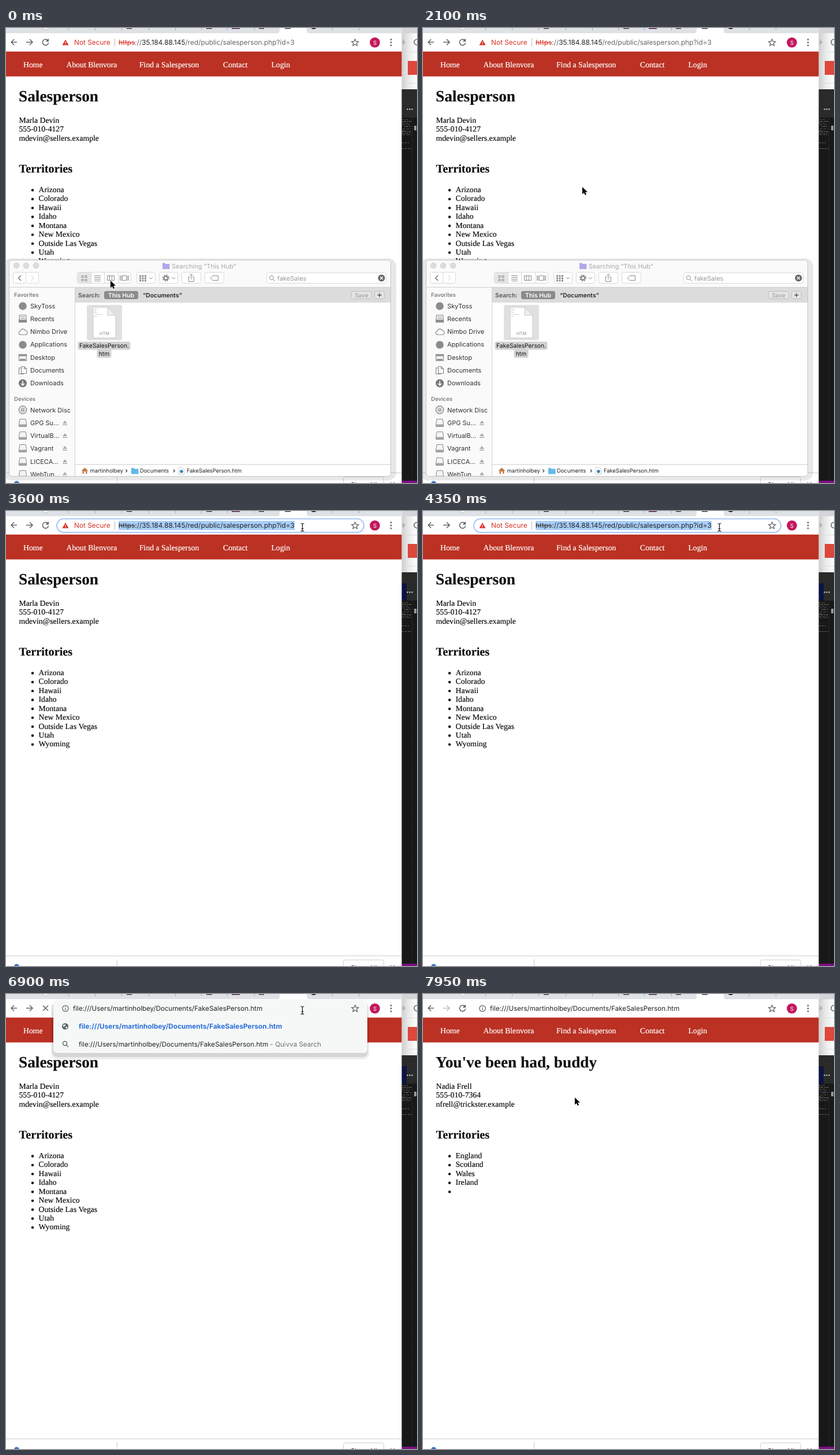
Recreate the animation shown at these times as an HTML page. Size 712 by 787 pixels, loop 8 s.

```html
<!DOCTYPE html>
<html lang="en">
<head>
<meta charset="utf-8">
<title>Browser and file search</title>
<style>
html, body { margin: 0; width: 100%; height: 100%; overflow: hidden; background: #fff; }
svg { display: block; width: 712px; height: 787px; text-rendering: geometricPrecision; }
text, .url { font-family: Inter, "Open Sans", sans-serif; white-space: pre; }
.serif text, .nav { font-family: "Liberation Serif", serif; font-size: 13.7px; }
.serif text { stroke: #000; stroke-width: .15; }
.nav { fill: #fff; stroke: #fff; stroke-width: .2; }
.serif .h1 { font-size: 27.3px; font-weight: 700; }
.serif .h2 { font-size: 20.3px; font-weight: 700; }
.bullets { stroke: #000; stroke-width: 4.4; stroke-linecap: round; stroke-dasharray: 0 15.42; }
.url { font-size: 11.6px; line-height: 16px; color: #222; }
.url.web { font-size: 11.85px; }
.url i { font-style: normal; color: #666; }
.url s { color: #d93025; }
.url .sel { background: #a9cffb; display: inline-block; height: 16px; }
.url .sel s { color: #333; }
.bar { font-size: 11.6px; }
.bar.wide { font-size: 11.85px; }
.line { fill: none; stroke: #5f6368; stroke-width: 1.5; }
.btn { fill: #fff; stroke: #d9d9d9; }
.glyph { fill: none; stroke: #8c8c8c; }
.side { font-size: 11px; fill: #333; }
.head { font-size: 9.6px; font-weight: 600; fill: #7c7c7c; }
.path { font-size: 9.35px; fill: #222; }

.a { animation: 8s step-end infinite; }
.finder { animation-name: finder; }
.gap { animation-name: gap; }
.before { animation-name: before; }
.after { animation-name: after; }
.plain { animation-name: plain; }
.picked { animation-name: picked; }
.typed { animation-name: typed; }
.ghost { animation-name: ghost; }
.panel { animation-name: panel; }
.caret { animation-name: caret; display: inline-block; width: 1px; height: 16px; background: #000; vertical-align: top; }
.opened { animation-name: opened; }
.star { animation-name: star; }
.site { animation-name: site; }
.idle { animation-name: idle; }
.busy { animation-name: busy; }
.arrow { animation-name: arrow; }
.beam { animation-name: beam; }
.mouse { animation-name: mouse; }
@keyframes finder { 0% { opacity: 1 } 28.125% { opacity: 0 } }
@keyframes gap { 0% { opacity: 0 } 28.125% { opacity: 1 } }
@keyframes before { 0% { opacity: 1 } 88.125% { opacity: 0 } }
@keyframes after { 0% { opacity: 0 } 88.125% { opacity: 1 } }
@keyframes plain { 0% { opacity: 1 } 43.125% { opacity: 0 } }
@keyframes picked { 0%, 67.5% { opacity: 0 } 43.125% { opacity: 1 } }
@keyframes typed { 0%, 86.25% { opacity: 0 } 67.5% { opacity: 1 } }
@keyframes ghost { 0%, 69.375% { opacity: 0 } 67.5% { opacity: .7 } }
@keyframes panel { 0%, 88.125% { opacity: 0 } 67.5% { opacity: 1 } }
@keyframes caret { 0%, 80.625% { opacity: 1 } 73.125% { opacity: 0 } }
@keyframes opened { 0% { opacity: 0 } 86.25% { opacity: 1 } }
@keyframes star { 0%, 86.25% { opacity: 1 } 67.5% { opacity: 0 } }
@keyframes site { 0% { opacity: 1 } 67.5% { opacity: 0 } }
@keyframes idle { 0%, 88.125% { opacity: 1 } 86.25% { opacity: 0 } }
@keyframes busy { 0%, 88.125% { opacity: 0 } 86.25% { opacity: 1 } }
@keyframes arrow { 0%, 91.875% { opacity: 1 } 43.125% { opacity: 0 } }
@keyframes beam { 0%, 91.875% { opacity: 0 } 43.125% { opacity: 1 } }
@keyframes mouse {
  0% { transform: translate(181px, 437px) }
  1.875% { transform: translate(290px, 560px) }
  3.75% { transform: translate(400px, 690px) }
  5.625% { transform: translate(330px, 758px) }
  7.5% { transform: translate(150px, 756px) }
  9.375% { transform: translate(250px, 400px) }
  11.25% { transform: translate(420px, 40px) }
  13.125% { transform: translate(470px, 62px) }
  15% { transform: translate(330px, 200px) }
  16.875% { transform: translate(150px, 420px) }
  18.75% { transform: translate(60px, 560px) }
  20.625% { transform: translate(105px, 550px) }
  22.5% { transform: translate(150px, 400px) }
  24.375% { transform: translate(230px, 310px) }
  26.25% { transform: translate(276px, 275px) }
  30% { transform: translate(210px, 200px) }
  31.875% { transform: translate(140px, 142px) }
  35.625% { transform: translate(250px, 100px) }
  37.5% { transform: translate(420px, 50px) }
  39.375%, 43.125% { transform: translate(513px, 28px) }
  91.875% { transform: translate(500px, 80px) }
  93.75% { transform: translate(463px, 141px) }
  97.5% { transform: translate(350px, 165px) }
  99.375%, 100% { transform: translate(263px, 179px) }
}
</style>
</head>
<body>
<svg viewBox="0 0 712 787">
<defs>
  <linearGradient id="edge"><stop stop-color="#cdcdcd"/><stop offset=".45" stop-color="#e9e9e9"/><stop offset="1" stop-color="#fff"/></linearGradient>
  <clipPath id="win"><rect x="6" y="402" width="661" height="373" rx="5"/></clipPath>
  <g id="globe"><circle r="5.6" fill="#5f6368"/><path d="M-4-2q2-2 4-1.5l1 2-3 1.5 0 2zM1 1l3-1-1 3-2 1.5z" fill="#fff"/></g>
  <g id="drive"><path d="M-5-6.5h10l1.500 8v5h-13v-5z" fill="#f4f4f4" stroke="#858585"/><path d="M-6.500 2.500h13v4h-13z" fill="#a5a5a5"/></g>
  <g id="eject" fill="#aaa"><path d="M-4 1L0-4 4 1zM-4 2.500h8v1.500h-8z"/></g>
  <path id="folder" d="M-6-5h4l1.500 1.500H6.500v9H-6z"/>
  <path id="lens" d="M2.300 2.300L5.500 5.500M3-.5a3.500 3.500 0 1 1-7 0a3.500 3.500 0 1 1 7 0z" fill="none"/>
  <path id="next" d="M-1.200-2.500l2.500 2.500-2.500 2.500" fill="none" stroke="#444" stroke-width="1.200"/>
  <g id="menu">
    <text class="nav" x="104.500" y="68">About Blenvora</text><text class="nav" x="231" y="68">Find a Salesperson</text>
    <text class="nav" x="376" y="68">Contact</text><text class="nav" x="459.500" y="68">Login</text>
  </g>
</defs>

<!-- windows behind, right edge -->
<rect x="685" width="27" height="106" fill="url(#edge)"/>
<path d="M685 0h27v9h-27z" fill="#d3d5d8"/>
<path d="M694 41.500h18M694 95.500h18" stroke="#ddd"/>
<path d="M683 24.500h8M687 20.500l4 4-4 4" class="line" style="stroke:#aaa"/>
<path d="M712 19.500a5 5 0 0 0 0 10" class="line"/>
<rect x="696" y="57" width="24" height="24" fill="#dc483c"/>
<path d="M685 106h27v51h-27z" fill="#2a2a2a"/>
<path d="M685 155h27v632h-27z" fill="#181818"/>
<g fill="#ccc"><circle cx="695.500" cy="140.500" r="1.200"/><circle cx="699.500" cy="140.500" r="1.200"/><circle cx="703.500" cy="140.500" r="1.200"/></g>
<g fill="none" stroke-width="1" opacity=".75">
  <path d="M686 158.500h12M686 164.500h14M688 174.500h13M686 182.500h15" stroke="#8f7355" stroke-dasharray="3 2 1 1"/>
  <path d="M686 161.500h16M690 170.500h11M686 179.500h16" stroke="#999" stroke-dasharray="2 1 4 2"/>
  <path d="M687 167.500h14M686 177.500h9M687 184.500h15" stroke="#52708c" stroke-dasharray="4 2 1 1"/>
  <path d="M686 198.500h12M686 208.500h17" stroke="#888" stroke-dasharray="3 2"/>
</g>
<path d="M703.500 157v630" stroke="#333" stroke-dasharray="2 2"/>
<path d="M707 169h4v8h-4z" fill="#999"/>
<path d="M685 783h27v4h-27z" fill="#7c0f83"/>
<path class="a gap" d="M685 125h9v30h-9z" fill="#0c1440"/>

<!-- browser -->
<path d="M0 0h685.500v787H0z" fill="#fff"/>
<path d="M0 0h685.500v9H0z" fill="#dee1e6"/>
<path d="M470 9q4 0 4-5V0h47v4q0 5 4 5z" fill="#fff"/>
<path d="M108.500 0v4M154.500 0v4M200.500 0v4M247.500 0v4M293.500 0v4M338.500 0v4M383.500 0v4M430.500 0v4M565.500 0v4M611.500 0v4" stroke="#a6a9ad"/>
<path d="M209 0h9v1.500h-9zM347 0h10v1.500h-10zM438 0h9v1.500h-9z" fill="#444"/>
<path d="M391 0h14v1.500h-14z" fill="#4b2148"/>
<path class="a idle" d="M483 0h10v1.500h-10z" fill="#444"/>
<circle cx="533" cy="-4" r="6" fill="#222"/>
<circle cx="69" cy="-2" r="5" fill="#fff" stroke="#bbb"/>

<path class="line" d="M19 24.500H9M14 19.500l-5 5 5 5"/>
<path class="line a before" d="M35 24.500h10.500M41 19.500l5 5-5 5"/>
<path class="line a after" style="stroke:#c0c0c0" d="M35 24.500h10.500M41 19.500l5 5-5 5"/>
<g class="a idle"><path class="line" d="M72.500 21.200a5.200 5.200 0 1 0 1.200 4.500"/><path d="M74 18v5.500h-5.500z" fill="#5f6368"/></g>
<path class="line a busy" d="M64 20l9 9M73 20l-9 9"/>
<circle cx="639" cy="25" r="8.800" fill="#c2185b"/>
<text x="639" y="28.500" font-size="9.500" fill="#fff" text-anchor="middle">S</text>
<g fill="#5f6368"><circle cx="667" cy="20" r="1.400"/><circle cx="667" cy="25" r="1.400"/><circle cx="667" cy="30" r="1.400"/></g>

<path d="M0 40.700h685.500v43H0z" fill="#bb3123"/>
<text class="nav" x="30" y="68">Home</text>
<use href="#menu"/>

<g class="serif">
  <text class="h2" x="22.500" y="250" fill="#111">Territories</text>
  <g class="a before">
    <text class="h1" x="22" y="127" fill="#111">Salesperson</text>
    <text y="164"><tspan x="22.500">Marla Devin</tspan><tspan x="22.500" dy="15.420">555-010-4127</tspan><tspan x="22.500" dy="15.420">mdevin@sellers.example</tspan></text>
    <path class="bullets" d="M46 280.500v123.500"/>
    <text y="284"><tspan x="56.500">Arizona</tspan><tspan x="56.500" dy="15.420">Colorado</tspan><tspan x="56.500" dy="15.420">Hawaii</tspan><tspan x="56.500" dy="15.420">Idaho</tspan><tspan x="56.500" dy="15.420">Montana</tspan><tspan x="56.500" dy="15.420">New Mexico</tspan><tspan x="56.500" dy="15.420">Outside Las Vegas</tspan><tspan x="56.500" dy="15.420">Utah</tspan><tspan x="56.500" dy="15.420">Wyoming</tspan></text>
  </g>
  <g class="a after">
    <text class="h1" x="22" y="127" fill="#111">You've been had, buddy</text>
    <text y="164"><tspan x="22.500">Nadia Frell</tspan><tspan x="22.500" dy="15.420">555-010-7364</tspan><tspan x="22.500" dy="15.420">nfrell@trickster.example</tspan></text>
    <path class="bullets" d="M46 280.500v62"/>
    <text y="284"><tspan x="56.500">England</tspan><tspan x="56.500" dy="15.420">Scotland</tspan><tspan x="56.500" dy="15.420">Wales</tspan><tspan x="56.500" dy="15.420">Ireland</tspan></text>
  </g>
</g>

<!-- download shelf -->
<path d="M0 769.500h685M192.500 775v12" stroke="#cfcfcf"/>
<circle cx="18.500" cy="788" r="4.500" fill="#3f74c8"/>
<rect x="584.500" y="776.500" width="70" height="20" rx="3" fill="#fff" stroke="#d0d0d0"/>
<text x="597" y="793.500" font-size="11.200" fill="#333">Show All</text>
<path class="line" d="M666 786l7 7M673 786l-7 7"/>

<!-- address bar -->
<rect class="a picked" x="88" y="13.500" width="532" height="23.500" rx="11.700" fill="#fff" stroke="#a8c7f6" stroke-width="2"/>

<g class="a panel">
  <rect x="78" y="14" width="551" height="99" rx="10" opacity=".07"/>
  <rect x="80" y="14" width="547" height="95" rx="9" opacity=".1"/>
  <rect x="82" y="10" width="544" height="92" rx="6" fill="#f6f8f8"/>
  <g class="a typed"><rect x="82" y="10" width="544" height="92" rx="6" fill="#fff"/><path d="M82 41h544v30H82z" fill="#ededed"/></g>
  <use class="a ghost" href="#menu"/>
  <use href="#globe" x="102.500" y="56"/>
  <text class="bar wide" x="126" y="60" font-weight="700" fill="#2a6fdb">file:///Users/martinholbey/Documents/FakeSalesPerson.htm</text>
  <use href="#lens" x="102.500" y="86" stroke="#5f6368" stroke-width="1.400"/>
  <text class="bar" x="126" y="90.500" fill="#222">file:///Users/martinholbey/Documents/FakeSalesPerson.htm<tspan fill="#6b6f73"> - Quivva Search</tspan></text>
</g>

<path class="line a star" style="stroke-width:1.300" d="M604.700 19.300l1.700 3.900 4.200.4-3.200 2.800 1 4.100-3.700-2.200-3.700 2.200 1-4.100-3.200-2.800 4.200-.4z"/>

<g class="a site">
  <path d="M103 20l5.500 9.800h-11z" fill="#d93025"/><path d="M103 23.500v3M103 27.500v1.200" stroke="#fff" stroke-width="1.200"/>
  <text class="bar wide" x="118" y="29" fill="#d93025">Not Secure</text>
  <path d="M188.500 18v14" stroke="#bbb"/>
</g>
<foreignObject class="a plain" x="195" y="17" width="420" height="18"><div class="url web"><s>https</s><i>://</i>35.184.88.145<i>/red/public/salesperson.php?id=3</i></div></foreignObject>
<foreignObject class="a picked" x="195" y="17" width="420" height="18"><div class="url web"><span class="sel"><s>https</s>://35.184.88.145/red/public/salesperson.php?id=3</span></div></foreignObject>
<g class="a typed">
  <use href="#globe" x="102.500" y="25"/>
  <foreignObject x="126" y="17" width="470" height="18"><div class="url">file:///Users/martinholbey/Documents/FakeSalesPerson.htm<span class="a caret"></span></div></foreignObject>
</g>
<g class="a opened">
  <circle cx="103" cy="25" r="5.200" class="line" style="stroke-width:1.300"/><path d="M103 24v4M103 21.700v1.400" stroke="#5f6368" stroke-width="1.300"/>
  <foreignObject x="116" y="17" width="470" height="18"><div class="url">file:///Users/martinholbey/Documents/FakeSalesPerson.htm</div></foreignObject>
</g>

<!-- file window -->
<g class="a finder">
  <rect x="-5" y="398.500" width="681" height="384" rx="14" opacity=".09"/>
  <g clip-path="url(#win)">
    <path d="M6 402h661v373H6z" fill="#fff"/>
    <path d="M6 402h661v47H6zM6 449h114v326H6z" fill="#fafafa"/>
    <path d="M120 449h547v26H120z" fill="#dcdcdc"/>
    <path d="M6 448.500h661M119.500 449v326" stroke="#d0d0d0"/>
    <path d="M120 755h547" stroke="#c9c9c9"/>

    <g fill="#dcdcdc" stroke="#d0d0d0"><circle cx="18" cy="411" r="4.800"/><circle cx="35" cy="411" r="4.800"/><circle cx="52" cy="411" r="4.800"/></g>
    <use href="#folder" x="277" y="411.500" fill="#b3a7ea"/>
    <text x="287" y="415.500" font-size="11" fill="#a8a8a8">Searching “This Hub”</text>

    <g class="btn">
      <rect x="12.500" y="422.500" width="22" height="19" rx="3"/><rect x="34.500" y="422.500" width="22" height="19" rx="3"/>
      <rect x="123.500" y="422.500" width="93" height="19" rx="3"/>
      <rect x="226.500" y="422.500" width="32" height="19" rx="3"/><rect x="265.500" y="422.500" width="32" height="19" rx="3"/>
      <rect x="304.500" y="422.500" width="33" height="19" rx="3"/><rect x="344.500" y="422.500" width="33" height="19" rx="3"/>
      <rect x="451.500" y="423.500" width="207" height="18" rx="3"/>
      <path d="M124 423h23v18h-23z" fill="#e6e6e6" stroke="none"/><path d="M147.500 423v18M170.500 423v18M194.500 423v18"/>
    </g>
    <g class="glyph">
      <path d="M26 428l-4.500 4.500 4.500 4.500" stroke="#666" stroke-width="1.300"/><path d="M43.500 428l4.500 4.500-4.500 4.500" stroke="#c4c4c4"/>
      <path d="M131 428.500h3v3h-3zM137 428.500h3v3h-3zM131 434.500h3v3h-3zM137 434.500h3v3h-3z"/>
      <path d="M153 428.500h11M153 431.500h11M153 434.500h11M153 437.500h11"/>
      <path d="M175.500 428.500h12v8h-12zM179.500 428v8M183.500 428v8"/>
      <path d="M201.500 428.500h7v8h-7zM197.500 428v9M199.500 428v9M210.500 428v9M212.500 428v9"/>
      <path d="M231 429h12M231 433h12M231 437h12" stroke-width="3" stroke-dasharray="3 1.500"/>
      <path d="M248 431l3 3 3-3M287 431l3 3 3-3"/>
      <circle cx="277" cy="432.500" r="3.300" stroke-width="2.400"/><circle cx="277" cy="432.500" r="5.300" stroke-width="1.800" stroke-dasharray="2 2.160"/>
      <path d="M319 430.500h-2.500v8h9v-8H323M321 435v-9M318.500 428l2.500-2.500 2.500 2.500"/>
      <path d="M354 432.500l4-4h9.500v8H358zM358 432h.8"/>
      <use href="#lens" x="460.500" y="432.500"/>
    </g>
    <text x="470" y="436.500" font-size="11" fill="#999">fakeSales</text>
    <circle cx="650.500" cy="432.500" r="6" fill="#666"/><path d="M648 430l5 5M653 430l-5 5" stroke="#fff" stroke-width="1.300"/>

    <g font-size="10.400" font-weight="600" fill="#333">
      <text x="125" y="465.500" fill="#555">Search:</text>
      <rect x="170" y="455" width="59" height="14" rx="3.500" fill="#8b8b8b"/>
      <text x="199.500" y="465.500" fill="#fff" text-anchor="middle">This Hub</text>
      <text x="237" y="465.500" fill="#222">“Documents”</text>
    </g>
    <g fill="#e4e4e4" stroke="#bdbdbd"><rect x="598.500" y="455.500" width="35" height="13" rx="3"/><rect x="638.500" y="455.500" width="17" height="13" rx="3"/></g>
    <text x="616" y="465.700" font-size="10" fill="#999" text-anchor="middle">Save</text>
    <path d="M643.500 462h7M647 458.500v7" stroke="#555" stroke-width="1.400"/>

    <text class="head" x="14" y="464.700">Favorites</text>
    <text class="head" x="14" y="644.700">Devices</text>
    <g class="side">
      <text y="484.500"><tspan x="42">SkyToss</tspan><tspan x="42" dy="22.250">Recents</tspan><tspan x="42" dy="22.250">Nimbo Drive</tspan><tspan x="42" dy="22.250">Applications</tspan><tspan x="42" dy="22.250">Desktop</tspan><tspan x="42" dy="22.250">Documents</tspan><tspan x="42" dy="22.250">Downloads</tspan></text>
      <text y="664.500"><tspan x="42">Network Disc</tspan><tspan x="42" dy="22.250">GPG Su...</tspan><tspan x="42" dy="22.250">VirtualB...</tspan><tspan x="42" dy="22.250">Vagrant</tspan><tspan x="42" dy="22.250">LICECA...</tspan><tspan x="42" dy="22.250">WebTun...</tspan></text>
    </g>
    <g class="glyph" stroke-width="1.200">
      <circle cx="29" cy="481" r="6.800" fill="#8c8c8c" stroke="none"/>
      <path d="M23.500 496.500h11l1 12h-13zM25 499.500h8M25 502.500h8"/><path d="M22.500 505h13v4h-13z" fill="#8c8c8c"/>
      <path d="M25 530.500a3.300 3.300 0 0 1 0-6.500a4.500 4.500 0 0 1 8.500-.5a3.500 3.500 0 0 1 0 7z"/>
      <circle cx="29" cy="548" r="6.800" fill="#8c8c8c" stroke="none"/>
      <path d="M22.500 564.500h13v11h-13z"/><path d="M22.500 566.500h13M24 573.500h10" stroke-width="2.500"/>
      <path d="M26.500 585.500h5l4 4v8h-9zM31.500 585.500v4h4M26 588h-3.500v10.500h8V598"/>
      <circle cx="29" cy="614.500" r="7" fill="#777" stroke="none"/><path d="M29 610.500v7M26 615l3 3 3-3" stroke="#fff" stroke-width="1.600"/>
      <circle cx="29" cy="660.500" r="6.800" fill="#ddd"/><circle cx="29" cy="660.500" r="2"/>
    </g>
    <use href="#drive" x="29" y="683"/><use href="#drive" x="29" y="705"/><use href="#drive" x="29" y="727"/><use href="#drive" x="29" y="750"/><use href="#drive" x="29" y="772"/>
    <use href="#eject" x="102" y="683"/><use href="#eject" x="102" y="705"/><use href="#eject" x="102" y="727"/><use href="#eject" x="102" y="750"/><use href="#eject" x="102" y="772"/>

    <rect x="140" y="479" width="61" height="61" rx="3" fill="#e0e0e0"/>
    <path d="M151 483h25l14 14v39h-39z" fill="#fff" stroke="#c8c8c8"/>
    <path d="M176 483l14 14h-14z" fill="#eee" stroke="#c8c8c8"/>
    <path d="M153 486.500h6M153 489.500h4M153 492.500h5M155 495.500h12M153 498.500h5" stroke="#c4c4c4" stroke-dasharray="3 1"/>
    <text x="170.500" y="531" font-size="7.500" fill="#888" text-anchor="middle">HTM</text>
    <g fill="#d2d2d2"><rect x="124.500" y="542.500" width="91" height="14" rx="3"/><rect x="157.500" y="556.500" width="25" height="14" rx="3"/></g>
    <g font-size="10.250" fill="#111" text-anchor="middle"><text x="170" y="553">FakeSalesPerson.</text><text x="170" y="567">htm</text></g>

    <path d="M130.500 766l6-5.500 6 5.500h-2v5h-8v-5z" fill="#c57a45"/><path d="M135 767h3v4h-3z" fill="#fff"/>
    <use href="#folder" x="223" y="766" fill="#62b9ea"/>
    <path d="M299.500 760h6l3 3v9h-9z" fill="#fff" stroke="#ccc"/><circle cx="304" cy="767" r="2.700" fill="#2f83b7"/>
    <use href="#next" x="208.500" y="766"/><use href="#next" x="291" y="766"/>
    <g class="path"><text x="145.500" y="769">martinholbey</text><text x="232" y="769">Documents</text><text x="313" y="769">FakeSalesPerson.htm</text></g>
  </g>
  <rect x="5.500" y="401.500" width="661" height="374" rx="5" fill="none" stroke="#c6c6c6"/>
</g>

<!-- pointer -->
<g class="a mouse">
  <path class="a arrow" d="M0 0v12.400l2.900-2.700 1.900 4.300 2.200-1-1.900-4.200h3.900z" stroke="#fff" stroke-width=".8" paint-order="stroke"/>
  <path class="a beam" d="M-2.500-6.500q2.500 0 3 1.500q.5-1.500 3-1.500M.5-5v11M-2.500 7q2.500 0 3-1.500q.5 1.500 3 1.500M-1.500 2.500h4" fill="none" stroke="#111" stroke-width="1.200"/>
</g>
</svg>
</body>
</html>
```
